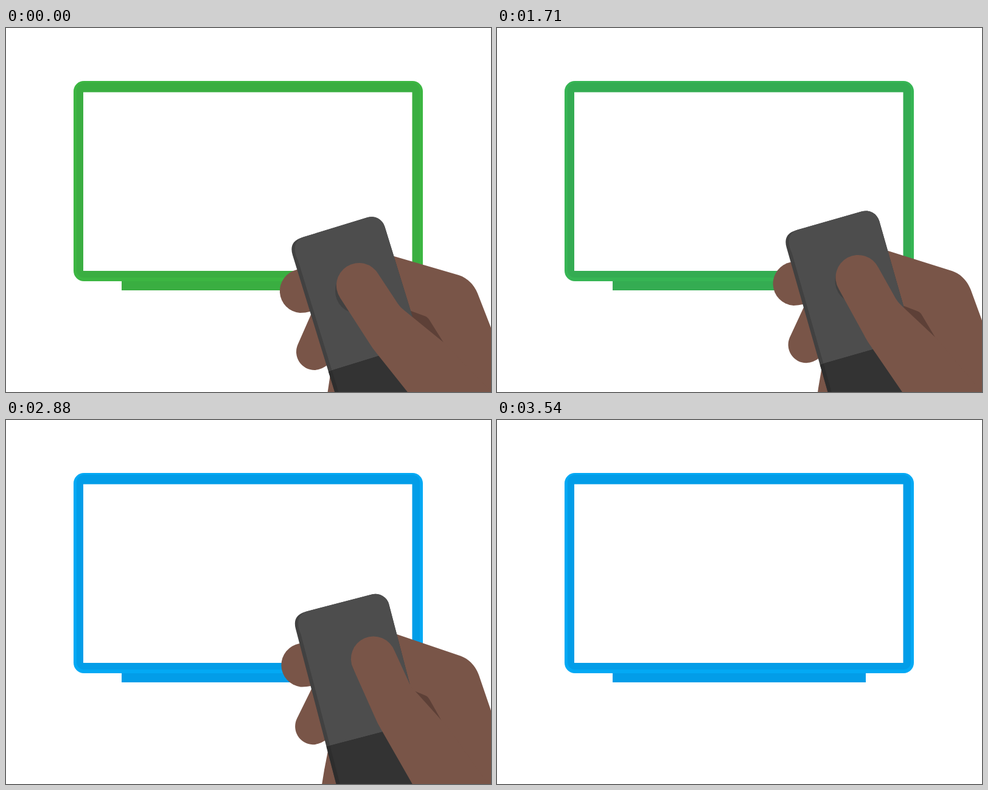
Animation of 797x598 px, one loop 6250 ms. Source, as an HTML page:

```html
<!DOCTYPE html>
<html lang="en">
<head>
<meta charset="utf-8">
<title>Remote control</title>
<style>
  html, body { margin: 0; width: 100%; height: 100%; overflow: hidden; background: #fff; }
  svg { display: block; width: 100vw; height: 100vh; }
</style>
</head>
<body>
<svg viewBox="0 0 797 598">
  <g id="tv">
    <rect id="stand" x="190" y="414" width="416" height="17"/>
    <rect id="rim" x="111" y="87" width="574" height="329" rx="17"/>
    <rect id="bezel" x="116" y="90" width="564" height="320" rx="12"/>
    <rect x="127" y="105.5" width="540.5" height="293.5" fill="#fff"/>
  </g>
  <g id="hand" fill="#795548">
    <!-- fingers behind the remote -->
    <path d="M500 395 L478 397 A36 36 0 0 0 483 468 Q492 468 501 465.500 L540 450Z"/>
    <path d="M501.500 470 L479.500 520 A30 30 0 0 0 507 562 Q520 561 530 552 L560 530 L540 460Z"/>
    <path d="M534 562 L528 602 L514 720 L620 720 L570 540Z"/>
    <!-- palm -->
    <path d="M600 364 L744 406 C757 410 769 421 775 436 L812 531 Q822 556 828 581 L850 720 L640 720 L600 480Z"/>
    <path d="M655 461 L689 473.500 Q693 475 696 480 L718.500 516 L700 540 L640 480Z" fill="#5d4037"/>
    <g transform="translate(464.200 351) rotate(-17.100)">
      <path d="M0 400 V23 Q0 0 23 0 H135.500 A23 23 0 0 1 158.500 23 V400Z" fill="#414141"/>
      <path d="M6 223 V34 C2 12 12 0 26 0 H135.500 A23 23 0 0 1 158.500 23 V223Z" fill="#4d4d4d"/>
      <path d="M0 223 H158.500 V400 H0Z" fill="#2d2d2d"/>
      <path d="M6 223 H158.500 V400 H6Z" fill="#333"/>
    </g>
    <circle id="shade" r="37" fill="#414141"/>
    <path id="thumb" d="M549.500 444 A37 37 0 1 1 612 404.500 L644 453 Q648 459 654 463.500 L718.500 516 L800 600 L790 720 L757 720 L610 535.500 Q602 526 596 516Z"/>
  </g>
</svg>
<script>
const LOOP = 6250;
const PIVOT = [566, 436];
const THUMB_BASE = [645, 610];
const GREEN = { rim: [60, 182, 66], bezel: [58, 174, 65] };
const BLUE = { rim: [3, 169, 244], bezel: [2, 157, 232] };
const $ = id => document.getElementById(id);

const ramp = (t, from, to) => Math.min(1, Math.max(0, (t - from) / (to - from)));
const ease = (t, from, to) => {
  const u = ramp(t, from, to);
  return u * u * (3 - 2 * u);
};
const tint = (name, p) =>
  `rgb(${GREEN[name].map((c, i) => Math.round(c + (BLUE[name][i] - c) * p))})`;

function draw(t) {
  const color = ease(t, 1600, 2170);
  $('rim').setAttribute('fill', tint('rim', color));
  $('bezel').setAttribute('fill', tint('bezel', color));
  $('stand').setAttribute('fill', tint('bezel', color));

  // slow drift, tilt as the thumb lifts, then drop out of view
  const lift = ease(t, 1290, 2170);
  const x = 7.5 * lift - 74.5 * ease(t, 2790, 3350);
  const y = -2.6 * ramp(t, 0, 1420) - 23.4 * ease(t, 1420, 2170) + 335 * ease(t, 3000, 3620);
  const tilt = 2.5 * lift - 9.5 * ease(t, 2860, 3540);
  $('hand').setAttribute('transform', `translate(${x} ${y}) rotate(${tilt} ${PIVOT})`);
  $('hand').setAttribute('visibility', t < 3540 ? 'visible' : 'hidden');

  const swing = 6.3 * lift;
  $('thumb').setAttribute('transform', `rotate(${swing} ${THUMB_BASE})`);
  const gap = 1 - lift;
  $('shade').setAttribute('transform',
    `rotate(${swing} ${THUMB_BASE}) translate(${581 - 3 * gap} ${425 + 7 * gap})`);
}

const start = performance.now();
function tick() {
  draw((performance.now() - start) % LOOP);
  requestAnimationFrame(tick);
}
tick();
</script>
</body>
</html>
```
